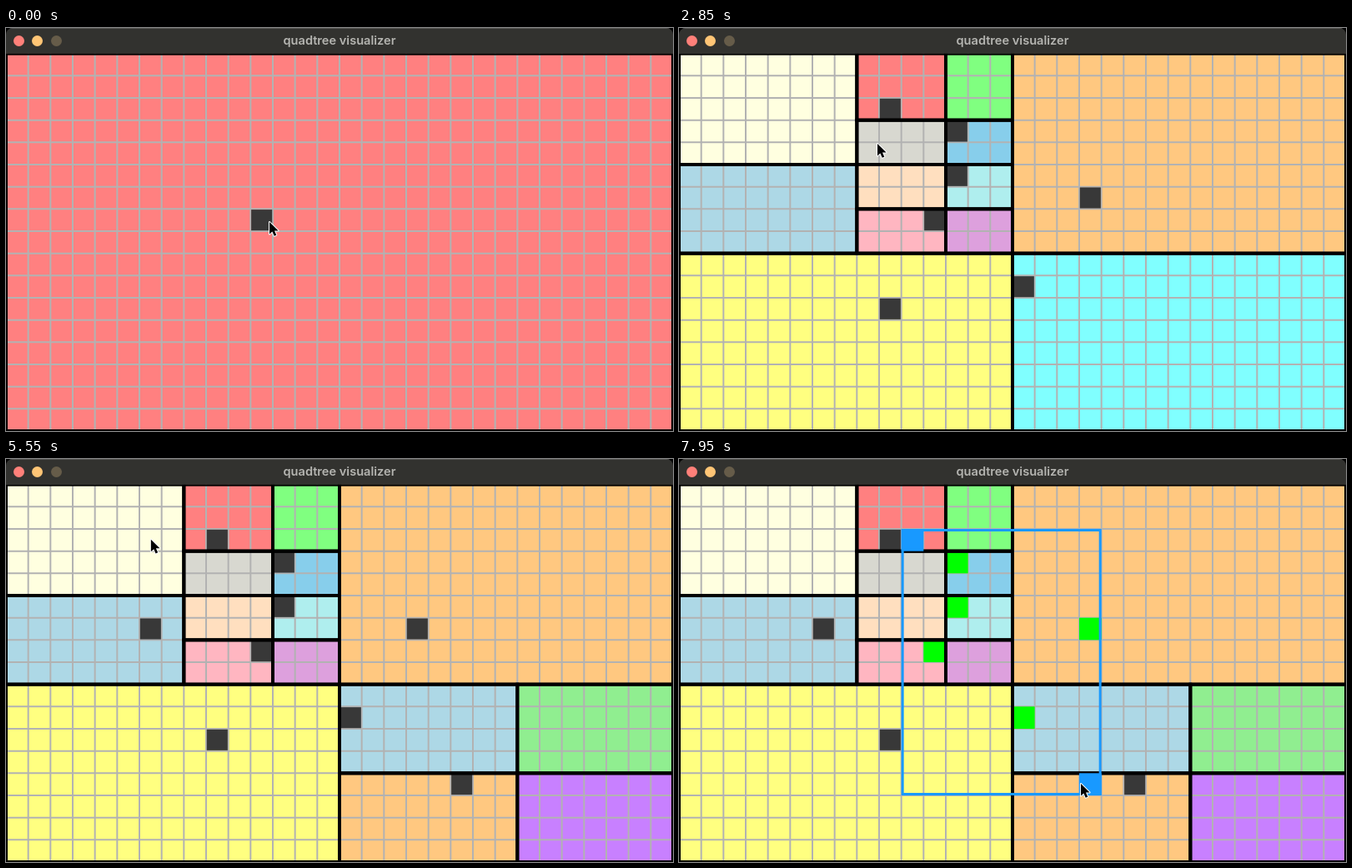
Recreate the animation shown at these times as an HTML page with a canvas. Size 800 by 484 pixels, loop 8 s.

```html
<!DOCTYPE html>
<html lang="en">
<head>
<meta charset="utf-8">
<title>quadtree visualizer</title>
<style>
  html, body { margin: 0; width: 100%; height: 100%; overflow: hidden; background: #000; }
  #win { position: relative; width: 800px; height: 484px; overflow: hidden; border-radius: 8px 8px 6px 6px; background: #000; }
  #bar { position: absolute; left: 0; top: 0; width: 800px; height: 31px; background: #32322f; box-shadow: inset 0 1px #555553; }
  #bar i { position: absolute; top: 8.5px; width: 13px; height: 13px; border-radius: 50%; }
  #bar b { position: absolute; left: 0; right: 0; top: 0; text-align: center; line-height: 30px;
    font: 600 14.6px/30px Inter, "Open Sans", sans-serif; color: #b5b5b1; }
  canvas { position: absolute; left: 0; top: 0; }
</style>
</head>
<body>
<div id="win">
  <div id="bar">
    <i style="left:9px;background:#ff8079"></i>
    <i style="left:31px;background:#ffc575"></i>
    <i style="left:53.5px;background:#665c49"></i>
    <b>quadtree visualizer</b>
  </div>
  <canvas id="view" width="800" height="484"></canvas>
</div>
<script>
const LOOP = 8000, STEP = 150;
const COLS = 30, ROWS = 17, CELL = 800 / 30, TOP = 484 - ROWS * CELL;
const DRAG_START = 6900;
const c = document.getElementById('view').getContext('2d');

// [time, column, row] of each placed point
const points = [
  [0, 11, 7], [450, 18, 6], [900, 15, 10], [1200, 9, 11], [1500, 9, 2],
  [1950, 12, 3], [2400, 12, 5], [3150, 6, 6], [3900, 20, 13]
];

// pointer path: [time, x, y]
const path = [
  [0, 316, 233], [450, 492, 206], [600, 477, 242], [900, 412, 310],
  [1200, 254, 337], [1500, 254, 98], [1650, 272, 122], [1950, 333, 124],
  [2400, 333, 178], [2850, 238, 139], [3150, 174, 204], [3900, 546, 391],
  [4800, 148, 71], [5400, 150, 86], [6300, 472, 230], [6900, 280, 98],
  [7950, 482, 390]
];

// child colours in the order: top left, top right, bottom left, bottom right
const palette = {
  '': ['#ff80ff', '#ffc880', '#ffff80', '#80ffff'],
  '0': ['#ffffe0', '#ffb6c1', '#add8e6', '#90ee90'],
  '01': ['#ff8080', '#80ff80', '#d8d8d0', '#87ceeb'],
  '03': ['#ffdfbf', '#afeeee', '#ffb6c1', '#dda0dd'],
  '3': ['#add8e6', '#90ee90', '#ffc880', '#c880ff']
};

const px = col => col * CELL;
const py = row => TOP + row * CELL;

// Splits any box holding more than one point; returns the leaves
function leaves(box, pts, key = '', color = '#ff8080') {
  const [x, y, w, h] = box;
  const inside = pts.filter(([, a, b]) => a >= x && a < x + w && b >= y && b < y + h);
  if (inside.length < 2 || !palette[key]) return [{ box, color }];
  const lw = Math.ceil(w / 2), th = Math.ceil(h / 2);
  return [
    [x, y, lw, th], [x + lw, y, w - lw, th],
    [x, y + th, lw, h - th], [x + lw, y + th, w - lw, h - th]
  ].flatMap((b, i) => leaves(b, inside, key + i, palette[key][i]));
}

function pointerAt(t) {
  const i = path.findIndex(p => p[0] >= t);
  if (i < 1) return path[0].slice(1);
  const [t0, x0, y0] = path[i - 1], [t1, x1, y1] = path[i];
  const u = (t - t0) / (t1 - t0), e = u * u * (3 - 2 * u);
  return [x0 + (x1 - x0) * e, y0 + (y1 - y0) * e];
}

function fillCell(col, row, color) {
  c.fillStyle = color;
  c.fillRect(px(col), py(row), CELL, CELL);
}

function drawGrid() {
  c.strokeStyle = '#b2b2b2';
  c.lineWidth = 2;
  c.beginPath();
  for (let i = 1; i < COLS; i++) { c.moveTo(px(i), TOP); c.lineTo(px(i), 484); }
  for (let j = 1; j < ROWS; j++) { c.moveTo(0, py(j)); c.lineTo(800, py(j)); }
  c.stroke();
}

function drawPointer(x, y) {
  const arrow = new Path2D('M0 0V14.6L3.4 11.5L5.7 16.8L8.3 15.7L6 10.5H10.6Z');
  c.save();
  c.translate(x, y);
  c.lineJoin = 'round';
  c.strokeStyle = '#fff';
  c.lineWidth = 2;
  c.stroke(arrow);
  c.fillStyle = '#000';
  c.fill(arrow);
  c.restore();
}

function queryAt(t, [x, y]) {
  if (t < DRAG_START) return null;
  const start = [10, 2], end = [Math.floor(x / CELL), Math.floor((y - TOP) / CELL)];
  const lo = start.map((v, i) => Math.min(v, end[i]));
  const hi = start.map((v, i) => Math.max(v, end[i]));
  return { start, end, lo, hi, has: (a, b) => a >= lo[0] && a <= hi[0] && b >= lo[1] && b <= hi[1] };
}

function draw(t) {
  const pts = points.filter(p => p[0] <= t);
  const pos = pointerAt(t), query = queryAt(t, pos);
  const tree = leaves([0, 0, COLS, ROWS], pts);

  c.clearRect(0, 0, 800, 484);
  c.save();
  c.beginPath();
  c.rect(0, TOP, 800, 484 - TOP);
  c.clip();
  for (const { box: [x, y, w, h], color } of tree) {
    c.fillStyle = color;
    c.fillRect(px(x), py(y), w * CELL, h * CELL);
  }
  drawGrid();

  for (const [, a, b] of pts) {
    if (query && query.has(a, b)) fillCell(a, b, '#00ff00');
    else {
      c.fillStyle = '#383838';
      c.fillRect(px(a) + .8, py(b) + .8, CELL - 1.6, CELL - 1.6);
    }
  }

  c.strokeStyle = '#000';
  c.lineWidth = 4;
  for (const { box: [x, y, w, h] } of tree) c.strokeRect(px(x), py(y), w * CELL, h * CELL);

  if (query) {
    const { start, end, lo, hi } = query;
    fillCell(...start, '#1899ff');
    fillCell(...end, '#1899ff');
    c.strokeStyle = '#1899ff';
    c.lineWidth = 3;
    c.strokeRect(px(lo[0]) + 1.5, py(lo[1]) + 1.5,
      (hi[0] - lo[0] + 1) * CELL - 3, (hi[1] - lo[1] + 1) * CELL - 3);
  }
  c.restore();
  drawPointer(...pos);
}

const began = performance.now();
function tick() {
  const t = (performance.now() - began) % LOOP;
  draw(Math.floor(t / STEP) * STEP);
  requestAnimationFrame(tick);
}
tick();
</script>
</body>
</html>
```
